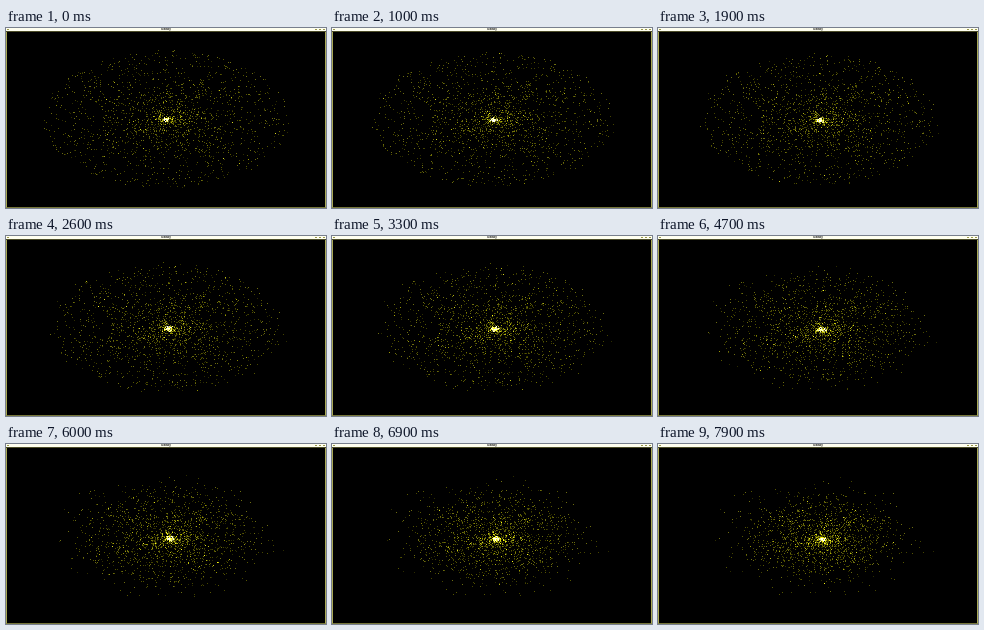
These frames come from a looping animation (320x180 px, 8 s). An HTML page with a canvas:

```html
<!DOCTYPE html>
<html lang="en">
<head>
<meta charset="utf-8">
<title>Particles</title>
<style>
  html, body { margin: 0; width: 100%; height: 100%; overflow: hidden; background: #000; }
  canvas { position: absolute; left: 0; top: 0; width: 320px; height: 180px; }
  .frame {
    position: absolute; left: 0; top: 0; width: 320px; height: 180px; box-sizing: border-box;
    border: solid #aaaa55; border-width: 0 1px 1px; border-bottom-color: #77773a;
  }
  .bar {
    position: absolute; left: 0; top: 0; width: 320px; height: 3px;
    background: #fffff0; border-bottom: 1px solid #4c4c28;
    font: bold 3px/3px "Liberation Sans", sans-serif; text-align: center; color: #222;
  }
  .bar i { position: absolute; top: 1px; width: 2px; height: 1px; background: #99994d; }
</style>
</head>
<body>
<canvas id="sky" width="320" height="180"></canvas>
<div class="frame"></div>
<div class="bar">Galaxy<i style="left:1px"></i><i style="left:309px"></i><i style="left:313px"></i><i style="left:317px"></i></div>
<script>
const LOOP = 8000, STEP = 100, COUNT = 1900, CORE = 34;
const RX = 123, RY = 69;
const ctx = document.getElementById('sky').getContext('2d');

let seed = 4127;
function rand() {
  seed = (seed * 1664525 + 1013904223) % 4294967296;
  return seed / 4294967296;
}
const spread = () => rand() + rand() + rand() - 1.5;

const tones = ['#2c2c00', '#444400', '#555500', '#6c6c10'];

const stars = Array.from({ length: COUNT }, () => {
  const r = rand();
  return {
    r,
    angle: rand() * Math.PI * 2,
    fall: 0.52 * Math.sqrt(rand()),
    spin: 0.07 / Math.pow(0.12 + r, 1.5),
    dx: spread() * 0.05,
    dy: spread() * 0.05,
    tone: tones[Math.floor(rand() * tones.length)]
  };
});

const core = Array.from({ length: CORE }, () => ({
  size: 0.4 + rand() * 2.2,
  angle: rand() * Math.PI * 2,
  speed: 3 + rand() * 5
}));

function dot(x, y, color) {
  ctx.fillStyle = color;
  ctx.fillRect(Math.round(x), Math.round(y), 1, 1);
}

function draw(ms) {
  const p = ms / LOOP;
  const cx = 160 + 4 * Math.sqrt(p);
  const cy = 91 + 4 * p;
  const infall = Math.pow(p, 1.3);

  ctx.globalCompositeOperation = 'source-over';
  ctx.fillStyle = '#000';
  ctx.fillRect(0, 0, 320, 180);
  ctx.globalCompositeOperation = 'lighter';

  for (const s of stars) {
    const r = s.r * (1 - s.fall * infall);
    const a = s.angle + s.spin * p;
    // The centre drifts; the outer rim stays almost in place.
    const pull = 1 - 0.6 * s.r;
    dot(160 + (cx - 160) * pull + RX * (r * Math.cos(a) + s.dx * p),
        91 + (cy - 91) * pull + RY * (r * Math.sin(a) + s.dy * p), s.tone);
  }

  const wide = 1 + 0.5 * Math.sin(Math.PI * p);
  for (const c of core) {
    const a = c.angle + c.speed * p;
    dot(cx + c.size * wide * 1.3 * Math.cos(a),
        cy + c.size * wide * 0.8 * Math.sin(a), '#89897a');
  }
  dot(cx, cy, '#fff');
  dot(cx - 1, cy, '#ffffe0');
}

function tick() {
  const ms = performance.now() % LOOP;
  draw(Math.floor(ms / STEP) * STEP);
  requestAnimationFrame(tick);
}
tick();
</script>
</body>
</html>
```
